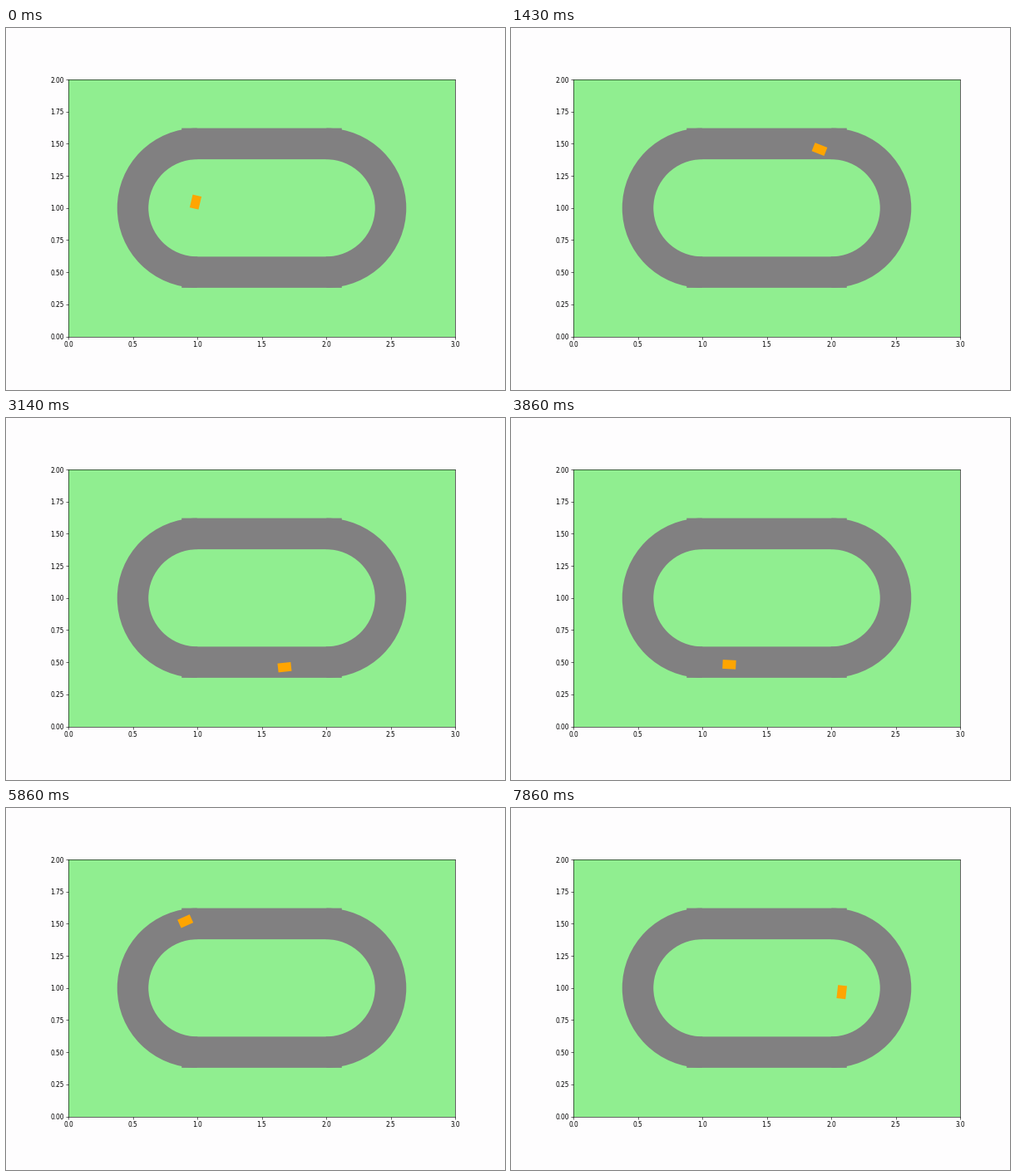
Write a matplotlib script that moves like this. It is 600 px wide and 436 px high and loops after 8000 ms.

```python
import numpy as np
import matplotlib.pyplot as plt
from matplotlib.animation import FuncAnimation
from matplotlib.patches import Arc, Rectangle

W, H, DPI = 600, 436, 60
FRAMES, FRAME_MS = 200, 40
ROAD = dict(color="#818081", linewidth=45, snap=False, zorder=1)
LENGTH, WIDTH = 0.103, 0.07

# Key points of the drive as x + iy, three steps apart, from step -3
GAP = 3
KEYS = np.array([
    0.987 + 0.580j, 0.987 + 1.046j, 1.294 + 1.394j, 1.760 + 1.505j,
    2.139 + 1.240j, 2.174 + 0.774j, 1.828 + 0.484j, 1.365 + 0.474j,
    0.910 + 0.539j, 0.585 + 0.871j, 0.653 + 1.342j, 1.061 + 1.564j,
    1.518 + 1.586j, 1.948 + 1.414j, 2.082 + 0.968j, 1.790 + 0.612j,
])


def spline_slopes(p):
    """Slopes of the natural cubic spline through evenly spaced points."""
    n = len(p)
    a = 4 * np.eye(n) + np.eye(n, k=1) + np.eye(n, k=-1)
    a[0, 0] = a[-1, -1] = 2
    padded = np.pad(p, 1, mode="edge")
    return np.linalg.solve(a, 3 * (padded[2:] - padded[:-2]))


SLOPES = spline_slopes(KEYS)


def position(step):
    i, u = divmod(step / GAP + 1, 1)
    i = int(i)
    v = 1 - u
    return (v * v * ((1 + 2 * u) * KEYS[i] + u * SLOPES[i])
            + u * u * ((1 + 2 * v) * KEYS[i + 1] - v * SLOPES[i + 1]))


plt.rcParams["axes.linewidth"] = 0.72
fig = plt.figure(figsize=(W / DPI, H / DPI), dpi=DPI, facecolor="#fefdfe")
ax = fig.add_axes([75 / W, 64.5 / H, 465 / W, 309.5 / H],
                  facecolor="lightgreen")
ax.set(xlim=(0, 3), ylim=(0, 2),
       xticks=np.arange(0, 3.1, 0.5), yticks=np.arange(0, 2.1, 0.25))
ax.tick_params(labelsize=9, length=3.15, pad=3.15, width=0.72)

for y in (0.5, 1.5):
    ax.plot([1, 2], [y, y], solid_capstyle="projecting", **ROAD)
for x, start in ((1, 90), (2, -90)):
    ax.add_patch(Arc((x, 1), 1, 1, theta1=start, theta2=start + 180, **ROAD))

car = ax.add_patch(Rectangle((0, 0), LENGTH, WIDTH, rotation_point="center",
                             facecolor="orange", linewidth=0, zorder=2))


def update(frame):
    # Five steps a second, shown on a clock of seven ticks a second
    tick = (frame * FRAME_MS + 30) * 7 // 1000
    step = (5 * tick + 2) // 7
    centre = position(step)
    # The car points along the stretch it has just driven
    heading = np.angle(centre - position(step - 0.6), deg=True)
    car.set_xy((centre.real - LENGTH / 2, centre.imag - WIDTH / 2))
    car.set_angle(heading)
    return [car]


anim = FuncAnimation(fig, update, frames=FRAMES, interval=FRAME_MS,
                     repeat=True, repeat_delay=0)
plt.show()
```
